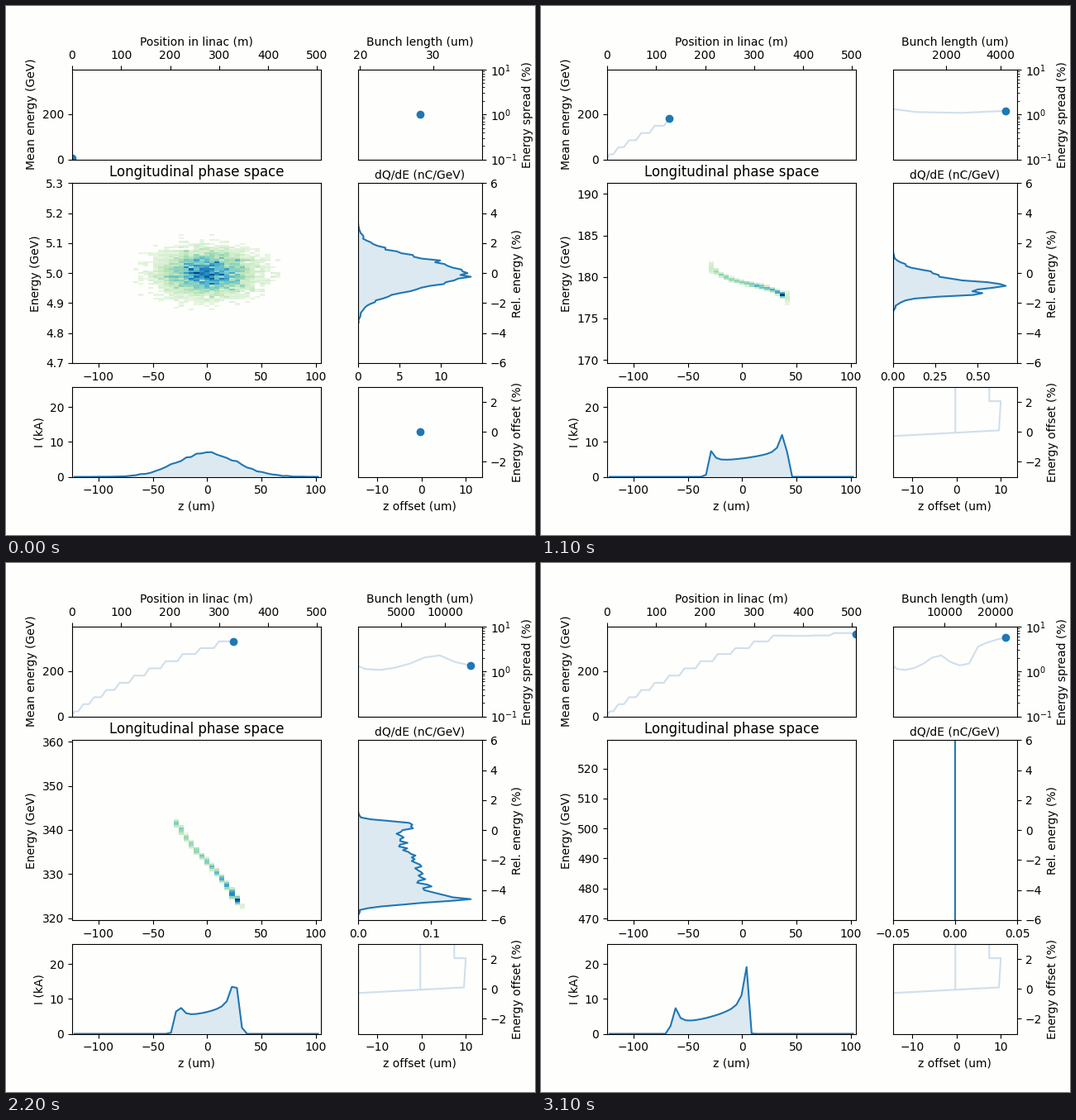
These frames come from a looping animation (640x640 px, 3.2 s). A matplotlib script:

```python
import numpy as np
import matplotlib.pyplot as plt
from matplotlib.animation import FuncAnimation

FRAMES = 32
PAPER, BLUE, TRAIL = "#fefefc", "#1f77b4", "#cfdfec"
N = 10000                         # macro particles
CHARGE, CURRENT_SUM = 1.6, 103.0  # nC, kA summed over the slices
Z_EDGES = np.linspace(-124.4, 104.6, 50)
D_EDGES = np.linspace(-6, 6, 100)

plt.rcParams.update({"font.family": "DejaVu Sans", "font.size": 10,
                     "figure.facecolor": PAPER, "axes.facecolor": PAPER})

# ---- beam model ---------------------------------------------------------
rng = np.random.default_rng(7)
u = (np.arange(N) + 0.5) / N
z_start = np.sort(rng.normal(0, 28.2, N))
d_start = rng.normal(0, 1, N)
jitter = rng.normal(0, 1, N)
slot = np.arange(49)


def sample(current):
    """Particle positions, in rank order, for a current per slice."""
    cdf = np.concatenate([[0], np.cumsum(current + 1e-9)])
    return np.interp(u, cdf / cdf[-1], Z_EDGES)


def horns(first, last, head, floor, ramp, tail, before=0, after=0):
    """Bunch with a spike at each end and a rising floor between them."""
    s = (slot - first) / (last - first)
    current = (floor + ramp * s**2 + (head - floor) * np.exp(-abs(slot - first) / 0.75)
               + (tail - floor - ramp) * np.exp(-abs(last - slot) / 0.75))
    current[(slot < first) | (slot > last)] = 0
    current[first - 1], current[last + 1] = before, after
    return sample(current)


def curve(z, mid, level, slope, cubic, core, rim):
    """Relative energy along the bunch, with more scatter at both ends."""
    w = z - mid
    edge = np.clip((abs(2 * u - 1) - 0.78) / 0.22, 0, 1)
    return level + slope * w + cubic * w**3 + jitter * (core + (rim - core) * edge)


key_t = [3, 11, 15, 19, 25, 31]
key_z = [
    sample(np.interp(slot, [17, 18, 24, 32, 34, 35, 36, 37],
                     [1.8, 3.2, 5, 6.7, 6.7, 5.9, 3.5, 0.9], left=0, right=0)),
    horns(20, 34, 7.5, 4.8, 2.9, 12.2, 0.6, 7.2),
    horns(20, 34, 6.4, 5.0, 3.3, 14.9),
    horns(21, 33, 9.4, 5.7, 3.0, 17.2, 0.1, 0.3),
    horns(20, 31, 9.7, 5.2, 4.2, 20, 0.7, 3.9),
    horns(13, 27, 7.6, 3.6, 5.9, 19.8, 2.3, 0.1),
]
shapes = [
    (2.25, 2.31, 0.0385, -4.57e-5, 0.06, 0.3),
    (8, -0.75, -0.0145, -1.2e-5, 0.09, 0.4),
    (3.6, -0.3, -0.07, -2e-5, 0.08, 0.1),
    (3.6, -2.2, -0.045, -3e-5, 0.08, 0.08),
    (0, -11, -0.14, 0, 0.1, 0.1),
    (-30, -26, -0.2, 0, 0.1, 0.1),
]
key_d = [curve(z, *shape) for z, shape in zip(key_z, shapes)]
key_d[0] -= 0.0123 * np.maximum(key_z[0] - 32, 0)**2  # drooping tail


def blend(t, states):
    i = min(np.searchsorted(key_t, t, side="right") - 1, len(key_t) - 2)
    f = (t - key_t[i]) / (key_t[i + 1] - key_t[i])
    return (1 - f) * states[i] + f * states[i + 1]


def beam(n):
    """Positions move between stages (even n), energies inside stages (odd n)."""
    z = z_start if n < 2 else blend(n | 1, key_z)
    if n == 0:
        return z, d_start
    if n < 3:
        move = key_z[0] - z_start
        return z, 4.6 + 0.6 * (move - move.mean()) + 0.3 * jitter
    t = (n - 1) | 1
    lift = np.interp(t, [3, 5, 11, 19, 21, 23, 25], [0, -1.3, 0, 0, 2.9, 4.6, 0])
    return z, blend(t, key_d) + lift


# ---- beam statistics, one entry per frame -------------------------------
frames = np.arange(FRAMES)
stage = (frames + 1) // 2
nominal = np.where(stage == 0, 5, 5 + 15.95 * (2 * stage - 1))

step = np.where(frames % 2 == 1, 10.64, 1.543 * np.sqrt(nominal))
step[:2] = 0, 5.32
position = np.cumsum(step)

loss = np.concatenate([np.zeros(10), [6, 8, 14.4, 47.2, 77.6, 98.5, 136]])
mean_energy = nominal - loss[stage] + np.isin(stage, (1, 2))
spread = np.array([1, 2.95, 1.76, 1.32, 1.13, 1.08, 1.2, 1.48, 2.04, 2.27, 1.62, 1.36,
                   1.49, 3.6, 4.4, 5.1, 5.7])[stage]
length = np.interp(stage, [3, 4, 6, 8, 10, 13, 16],
                   [25, 880, 4207, 7658, 11168, 16580, 21927])
length[:2] = 28.2
z_offset = np.full(FRAMES, -300.0)
z_offset[:8] = -0.28, -0.28, 7.4, 7.4, 10, 9.6, 9.6, -60
e_offset = np.full(FRAMES, -0.6)
e_offset[:8] = 0, 5, 5, 2.05, 2.05, 0.1, 0.1, -1.0

# ---- figure -------------------------------------------------------------
fig, axes = plt.subplots(3, 2, figsize=(6.4, 6.4), dpi=100,
                         gridspec_kw={"width_ratios": [2, 1], "height_ratios": [1, 2, 1]})
(ax_e, ax_s), (ax_ps, ax_q), (ax_i, ax_o) = axes

for ax in (ax_e, ax_s):
    ax.xaxis.tick_top()
    ax.xaxis.set_label_position("top")
for ax in (ax_s, ax_q, ax_o):
    ax.yaxis.tick_right()
    ax.yaxis.set_label_position("right")
ax_q.xaxis.set_label_position("top")

ax_e.set(xlabel="Position in linac (m)", ylabel="Mean energy (GeV)",
         xlim=(0, 507.2), ylim=(0, 398))
ax_s.set(xlabel="Bunch length (um)", ylabel="Energy spread (%)",
         yscale="log", ylim=(0.1, 10))
ax_ps.set(ylabel="Energy (GeV)", title="Longitudinal phase space")
ax_q.set(xlabel="dQ/dE (nC/GeV)", ylabel="Rel. energy (%)", ylim=(-6, 6))
ax_i.set(xlabel="z (um)", ylabel="I (kA)", xlim=(Z_EDGES[0], Z_EDGES[-1]), ylim=(0, 25.8))
ax_o.set(xlabel="z offset (um)", ylabel="Energy offset (%)", xlim=(-14.4, 13.7), ylim=(-3, 3))


def tracker(ax, x, y):
    trail, = ax.plot([], [], color=TRAIL)
    dot, = ax.plot([], [], "o", color=BLUE)
    return trail, dot, x, y


def filled(ax):
    area, = ax.fill([0, 0, 0], [0, 0, 0], color=BLUE, alpha=0.15, lw=0)
    line, = ax.plot([], [], color=BLUE)
    return area, line


def closed(values, base):
    """Outline of an area standing on zero."""
    return np.r_[0, values, 0], np.r_[base[0], base, base[-1]]


trackers = [tracker(ax_e, position, mean_energy), tracker(ax_s, length, spread),
            tracker(ax_o, z_offset, e_offset)]
q_area, q_line = filled(ax_q)
i_area, i_line = filled(ax_i)

cmap = plt.get_cmap("GnBu").copy()
cmap.set_bad(PAPER)
image = ax_ps.imshow(np.zeros((99, 49)), cmap=cmap, origin="lower", aspect="auto",
                     interpolation="nearest", vmin=0, vmax=1)
z_mid = (Z_EDGES[1:] + Z_EDGES[:-1]) / 2
d_mid = (D_EDGES[1:] + D_EDGES[:-1]) / 2


def draw(n):
    for trail, dot, x, y in trackers:
        trail.set_data(x[:n + 1], y[:n + 1])
        dot.set_data([x[n]], [y[n]])
    ax_s.set_xlim(19.7, max(36.66, 1.1 * length[n]))

    z, d = beam(n)
    density = np.histogram2d(d, z, bins=(D_EDGES, Z_EDGES))[0]
    image.set_data(np.ma.masked_less(density / max(density.max(), 1), 0.08))
    low, high = 0.94 * nominal[n], 1.06 * nominal[n]
    image.set_extent((Z_EDGES[0], Z_EDGES[-1], low, high))
    ax_ps.set_xlim(Z_EDGES[0], Z_EDGES[-1])
    ax_ps.set_ylim(low, high)

    current = np.histogram(z, Z_EDGES)[0] * CURRENT_SUM / N
    i_line.set_data(z_mid, current)
    height, base = closed(current, z_mid)
    i_area.set_xy(np.column_stack([base, height]))

    charge = np.histogram(d, D_EDGES)[0] * CHARGE / N / ((high - low) / len(d_mid))
    q_line.set_data(charge, d_mid)
    q_area.set_xy(np.column_stack(closed(charge, d_mid)))
    top = charge.max()
    ax_q.set_xlim((0, 1.1 * top) if top > 0 else (-0.05, 0.05))
    return []


anim = FuncAnimation(fig, draw, frames=FRAMES, init_func=lambda: draw(0),
                     interval=100, repeat=True, repeat_delay=0, blit=False)
plt.show()
```
